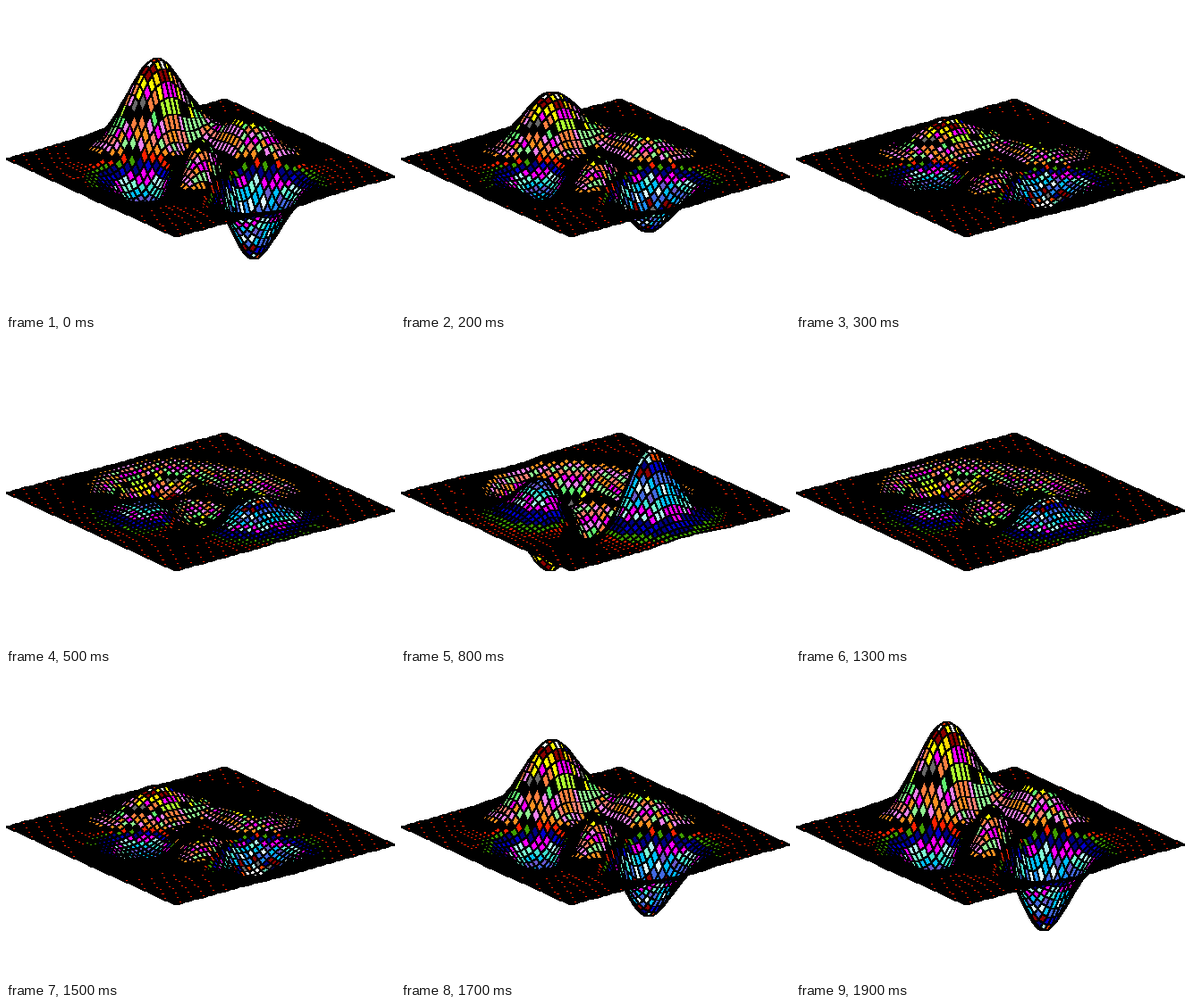
A matplotlib script that plays this animation: 435 px wide and 343 px high, repeating every 2000 ms.

```python
import numpy as np
import matplotlib.pyplot as plt
from matplotlib.animation import FuncAnimation
from matplotlib.collections import PolyCollection
from matplotlib.colors import ListedColormap

W, H, DPI = 435, 343, 100
FRAMES, STEP = 20, 100
N = 49

# colour bands from the deepest pit to the highest peak
BANDS = """
white white mediumaquamarine orangered paleturquoise dimgray navy mediumblue
dodgerblue darkred darkred royalblue deepskyblue dodgerblue lightcyan deepskyblue
royalblue slateblue deepskyblue turquoise aquamarine magenta paleturquoise magenta
navy mediumblue navy #40a000 #ff2000 black black #ff9020
violet lightgreen salmon #ff9020 magenta lightgreen violet #ff8040
#60f070 yellow black black greenyellow #ff8040 dimgray violet
#ff8040 yellow magenta #ff8040 violet yellow #ff8040 gold
darkred #ff8040 mediumblue darkred yellow white orangered #ff3000
""".split()


def peaks(x, y):
    return (3 * (1 - x) ** 2 * np.exp(-x ** 2 - (y + 1) ** 2)
            - 10 * (x / 5 - x ** 3 - y ** 5) * np.exp(-x ** 2 - y ** 2)
            - np.exp(-(x + 1) ** 2 - y ** 2) / 3)


axis = np.linspace(-3, 3, N)
X, Y = np.meshgrid(axis, axis)
Z = peaks(X, Y)
U, V = (X + 3) / 6, (Y + 3) / 6

# cells from back to front
rows, cols = np.divmod(np.arange((N - 1) ** 2), N - 1)
order = np.argsort(-(rows + cols), kind="stable")
rows, cols = rows[order], cols[order]
CORNERS = [(0, 0), (0, 1), (1, 1), (1, 0)]


def cells(scale):
    px = np.round(189 + 245 * U - 189 * V) + 0.5
    py = np.round(258 - 67 * U - 87 * V - 12.97 * scale * Z) + 0.5
    pts = np.stack([px, py], axis=-1)
    return np.stack([pts[rows + r, cols + c] for r, c in CORNERS], axis=1)


# the small margin keeps the pixel size from rounding down
fig = plt.figure(figsize=((W + 0.1) / DPI, (H + 0.1) / DPI), dpi=DPI,
                 facecolor="white")
ax = fig.add_axes([0, 0, W / (W + 0.1), H / (H + 0.1)])
ax.set(xlim=(0, W), ylim=(H, 0))
ax.axis("off")

surface = PolyCollection(cells(1), array=Z[rows, cols], cmap=ListedColormap(BANDS),
                         edgecolors="black", linewidths=0.72, antialiaseds=False)
surface.set_clim(Z.min(), Z.max())
ax.add_collection(surface, autolim=False)


def draw(i):
    surface.set_verts(cells(np.cos(2 * np.pi * (i + 1) / FRAMES)))
    return [surface]


anim = FuncAnimation(fig, draw, frames=FRAMES, interval=STEP, repeat=True,
                     repeat_delay=0, init_func=lambda: draw(0))
plt.show()
```
